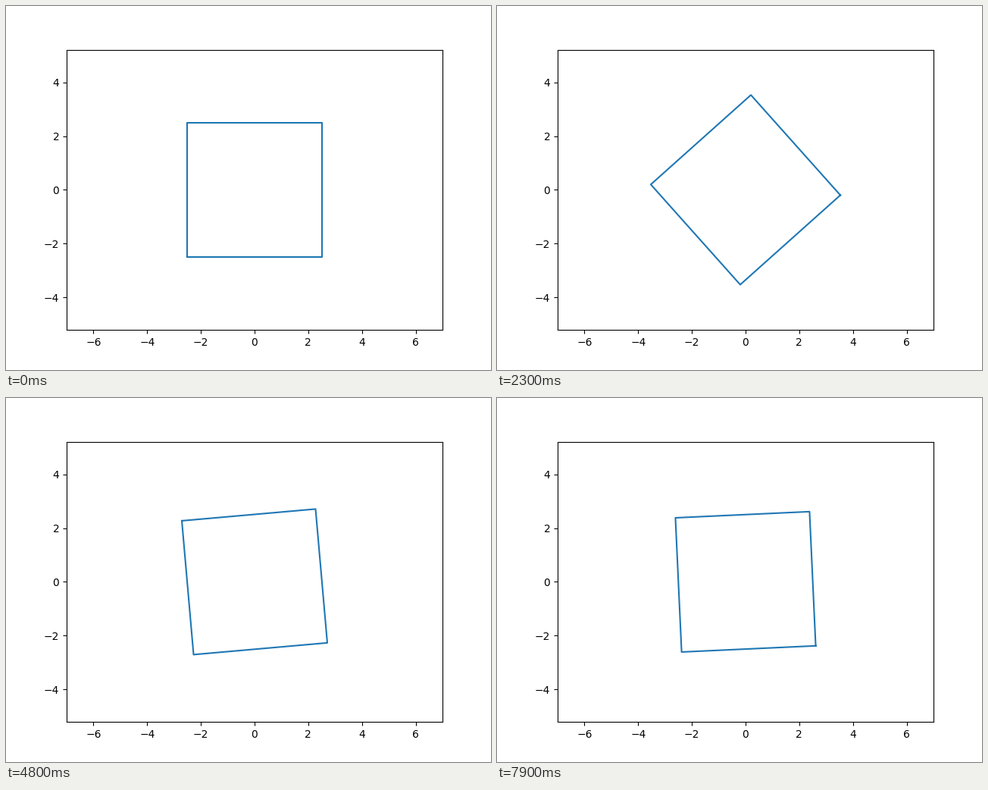
Recreate the animation shown at these times as a matplotlib script. Size 640 by 480 pixels, loop 8000 ms.

```python
import numpy as np
import matplotlib.pyplot as plt
from matplotlib.animation import FuncAnimation

FRAMES = 80
INTERVAL = 100  # ms
STEP = 0.1      # radians per frame
HALF = 2.5
X_MAX = 7

# Square outline, counterclockwise from the bottom-left corner
square = HALF * np.array([[-1, 1, 1, -1, -1],
                          [-1, -1, 1, 1, -1]])

fig, ax = plt.subplots(figsize=(6.4, 4.8), dpi=100)
box = ax.get_window_extent()
y_max = X_MAX * box.height / box.width  # equal scale on both axes
ax.set_xlim(-X_MAX, X_MAX)
ax.set_ylim(-y_max, y_max)
line, = ax.plot(*square)


def rotate(points, angle):
    c, s = np.cos(angle), np.sin(angle)
    return np.array([[c, -s], [s, c]]) @ points


def update(i):
    line.set_data(*rotate(square, STEP * i))
    return line,


anim = FuncAnimation(fig, update, frames=FRAMES, interval=INTERVAL,
                     repeat=True, repeat_delay=0)
plt.show()
```
